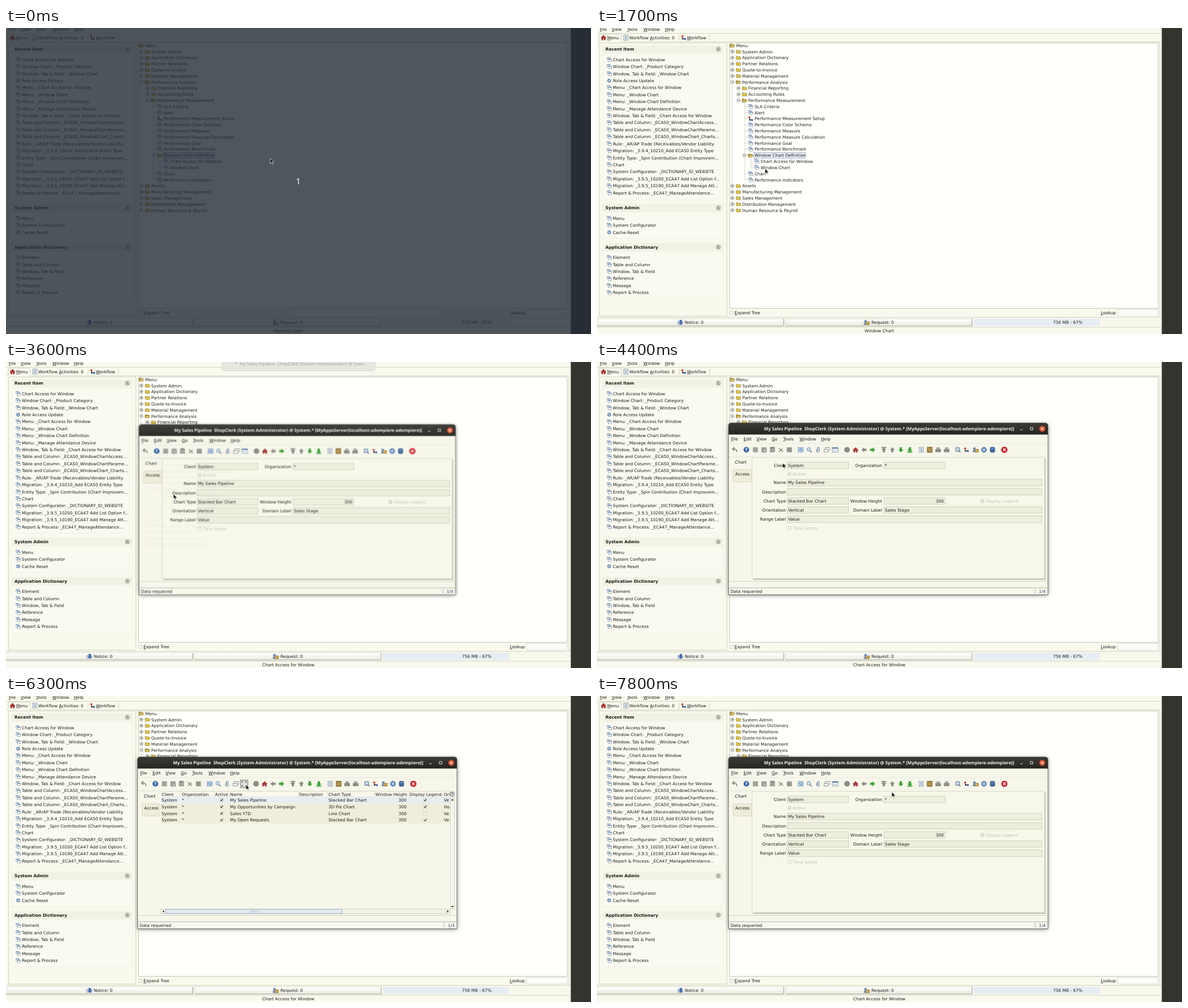
Animation of 1034 by 542 pixels, one loop 8000 ms. Source, as an HTML page:

```html
<!DOCTYPE html>
<html lang="en">
<head>
<meta charset="utf-8">
<title>Menu tree and chart window</title>
<style>
html, body { margin: 0; width: 100%; height: 100%; overflow: hidden; background: #34342f; }
svg { display: block; width: 1034px; height: 542px; }
text { font: 7.43px "DejaVu Sans", sans-serif; fill: #1c1c1a; white-space: pre; text-rendering: geometricPrecision; }
.bold { font-weight: bold; }
.italic { font-style: italic; }
.mid { text-anchor: middle; }
.end { text-anchor: end; }
.off { fill: #c3c3b6; }
.blue { fill: #34457c; }
.title { font: bold 7.8px "Noto Sans", "Open Sans", sans-serif; fill: #f2f1ec; }
.note { font: 7.8px "Noto Sans", "Open Sans", sans-serif; fill: #a3a39c; }
.count { font: 500 15px "Noto Sans", sans-serif; fill: #fff; }

#dim, #before, #after, #win, #note, #grid, #hover, #press, #cursor {
  animation: 8s step-end infinite;
}
#dim { animation-name: dim; }
#before { animation-name: before; }
#after { animation-name: after; }
#win { animation-name: win; transform-origin: 515px 408px; }
#note { animation-name: note; }
#grid { animation-name: grid; }
#hover { animation-name: hover; }
#press { animation-name: press; }
#cursor { animation-name: cursor; }

@keyframes dim { 0% { opacity: 1 } 6.25%, 100% { opacity: 0 } }
@keyframes before { 0% { opacity: 1 } 42.5%, 100% { opacity: 0 } }
@keyframes after { 0% { opacity: 0 } 42.5%, 100% { opacity: 1 } }
@keyframes win {
  0% { opacity: 0; transform: scale(.95) }
  43.75% { opacity: .5; transform: scale(.95) }
  45% { opacity: .96; transform: scale(.991) }
  46.25%, 100% { opacity: 1; transform: none }
}
@keyframes note { 0% { opacity: 0 } 43.75% { opacity: .5 } 45% { opacity: 1 } 46.25% { opacity: .5 } 47.5%, 100% { opacity: 0 } }
@keyframes grid { 0% { opacity: 0 } 68.75% { opacity: 1 } 80%, 100% { opacity: 0 } }
@keyframes hover { 0% { opacity: 0 } 61.25% { opacity: 1 } 92.5%, 100% { opacity: 0 } }
@keyframes press { 0% { opacity: 0 } 65% { opacity: 1 } 68.75% { opacity: 0 } 78.75% { opacity: 1 } 87.5%, 100% { opacity: 0 } }
/* The pointer advances once every 100 ms. */
@keyframes cursor {
  0% { transform: translate(467px, 231px) }
  6.25% { transform: translate(467px, 231px); animation-timing-function: steps(8) }
  16.25% { transform: translate(327px, 239px); animation-timing-function: steps(4) }
  21.25% { transform: translate(297px, 249px) }
  26.25% { transform: translate(297px, 249px); animation-timing-function: steps(3) }
  30% { transform: translate(296px, 234px) }
  50% { transform: translate(296px, 234px); animation-timing-function: steps(4) }
  55% { transform: translate(328px, 179px); animation-timing-function: steps(5) }
  61.25% { transform: translate(429px, 157px) }
  62.5% { transform: translate(429px, 157px); animation-timing-function: steps(2) }
  65% { transform: translate(424px, 157px) }
  93.75% { transform: translate(424px, 157px); animation-timing-function: steps(3) }
  97.5%, 100% { transform: translate(521px, 170px) }
}
</style>
</head>
<body>
<svg id="stage" viewBox="0 0 1034 542"></svg>
<script>
const CREAM = '#f9f9ed', PAPER = '#fffffb', EDGE = '#c9c9ba', FIELD = '#eeeedd';

// y is the middle of the capitals; "~" underlines the next letter.
const text = (x, y, s, cls = '') =>
  `<text x="${x}" y="${y + 2.7}" class="${cls}">` +
  s.replace(/~(.)/, '<tspan text-decoration="underline">$1</tspan>') + '</text>';
const rect = (x, y, w, h, fill, stroke = 'none', rx = 0) =>
  `<rect x="${x}" y="${y}" width="${w}" height="${h}" fill="${fill}" stroke="${stroke}" stroke-width=".8" rx="${rx}"/>`;
const path = (d, fill, stroke = 'none', width = .8) =>
  `<path d="${d}" fill="${fill}" stroke="${stroke}" stroke-width="${width}"/>`;
const disc = (x, y, r, fill, stroke = 'none') =>
  `<circle cx="${x}" cy="${y}" r="${r}" fill="${fill}" stroke="${stroke}"/>`;
const at = (x, y, s, turn = 0) => `<g transform="translate(${x} ${y}) rotate(${turn})">${s}</g>`;
const line = (d, color = EDGE, width = .8) => path(d, 'none', color, width);
const group = (id, s) => `<g id="${id}">${s}</g>`;

const pages = rect(-3.8, -3.6, 5.4, 4.4, '#f1f3f5', '#a3acb6') + rect(-3.8, -3.6, 5.4, 1.2, '#6d8db8') +
  rect(-1.5, -1, 5.4, 4.4, '#fafbfc', '#8e98a4') + rect(-1.5, -1, 5.4, 1.2, '#5d82b4');
const gear = disc(0, 0, 2.9, '#86a5c9', '#5f84b1') + disc(0, 0, 1.1, '#dfe8f1');
const flow = line('M-2-2V2H2', '#666') + rect(-3.6, -3.8, 3, 3, '#c92626') +
  rect(-2.6, .6, 2.6, 2.6, '#222') + rect(1, .8, 3, 3, '#2d4fa2');
const folder = path('M-3.7-2.6H-.8L0-1.7H3.7V2.8H-3.7Z', '#dfc646', '#8f7d2c', .7);
const openFolder = path('M-4-2.7H-1.2L-.4-1.8H2.6V2.8H-4Z', '#c2a63a', '#83742a', .7) +
  path('M-4 2.8L-2.2-.4H4.4L2.7 2.8Z', '#ecd76b', '#83742a', .7);
const home = path('M-4.6 .4L0-4.2L4.6 .4H3.3V4.2H1V1.5H-1V4.2H-3.3V.4Z', '#bd3030', '#6f2a2a', .6);
const lens = line('M1.5 1.5L4.5 4.5', '#6d7681', 1.6) + disc(-.8, -.8, 3.2, '#cfe0f2', '#6e87a6');
const tick = on => rect(-2.7, -2.7, 5.4, 5.4, '#fbfbf4', '#c6c6b8') + (on ? line('M-1.6-.2L-.4 1.4L1.9-1.7', on, 1.1) : '');
const paper = rect(-3.8, -4.4, 7.6, 8.8, '#f6f8fa', '#73859a') + line('M-2-2H2M-2 0H2M-2 2H2', '#4d6c94');
const clerk = rect(-3, -1, 8, 5, '#d8ab45', '#8b6c24') + disc(-2, -2, 2.4, '#6e8fb8') + rect(-5, 1, 5, 3, '#6e8fb8');
const arrow = color => path('M0-4.6L4.6 .2H2V4.4H-2V.2H-4.6Z', color);
const barArrow = color => arrow(color) + rect(-4.5, -5, 9, 1.8, color);

const chevron = y => disc(214.5, y, 3.7, '#f3f3e8', '#8f8f84') +
  line(`M212.7 ${y - .2}l1.8-1.8l1.8 1.8M212.7 ${y + 2.2}l1.8-1.8l1.8 1.8`, '#222', 1);

function section(y, title, rows) {
  let s = rect(10, y - 7, 213, 14, '#f1f1e4') + text(15, y, title, 'bold') + chevron(y);
  s += rect(10, y + 8, 213, rows.length * 12.42 + 9, '#fafaf0', '#f1f1e5');
  rows.forEach((row, i) => {
    const ry = y + 18.5 + i * 12.42;
    s += at(21.5, ry, /Role|Cache/.test(row) ? gear : pages) + text(28, ry, row);
  });
  return s;
}

// Each row: depth, kind (+ closed, - open, . leaf, f flow) and label.
const treeRows = `0-Menu|1+System Admin|1+Application Dictionary|1+Partner Relations|1+Quote-to-Invoice
1+Material Management|1-Performance Analysis|2+Financial Reporting|2+Accounting Rules
2-Performance Measurement|3.SLA Criteria|3.Alert|3fPerformance Measurement Setup
3.Performance Color Schema|3.Performance Measure|3.Performance Measure Calculation|3.Performance Goal
3.Performance Benchmark|3-Window Chart Definition|4.Chart Access for Window|4.Window Chart|3.Chart
3.Performance Indicators|1+Assets|1+Manufacturing Management|1+Sales Management
1+Distribution Management|1+Human Resource & Payroll`.split(/[|\n]/);

function tree() {
  let s = line('M239 36V323M250 101V128M261 133V269M272 231V247', '#c4c4bc', .7);
  treeRows.forEach((row, i) => {
    const depth = +row[0], kind = row[1], x = 246 + depth * 10.8, y = 31 + i * 10.81, ex = x - 17.6;
    if (depth) s += line(`M${ex} ${y}H${x - 10}`, '#c4c4bc', .7);
    if (depth && '+-'.includes(kind))
      s += rect(ex - 2.4, y - 2.4, 4.8, 4.8, '#fff', '#9a9a90') +
        line(`M${ex - 1.5} ${y}h3` + (kind == '+' ? `M${ex} ${y - 1.5}v3` : ''), '#333');
    s += at(x - 6.8, y, { '+': folder, '-': openFolder, '.': pages, f: flow }[kind]) + text(x, y, row.slice(2));
  });
  return s;
}

const statusButton = x => rect(x, 515, 330, 12.6, 'url(#button)', '#d5d5c8') +
  line(`M${x} 527.8H${x + 330}V515`, '#a5a59a', 1);

function desktop() {
  return rect(0, 0, 1034, 542, '#34342f') + rect(0, 0, 998.3, 542, CREAM) +
    [[5, '~File'], [26, '~View'], [53, '~Tools'], [82, '~Window'], [120, '~Help']].map(m => text(m[0], 2, m[1])).join('') +
    line('M0 9.5H998M0 24.5H4M42.5 24.5H994') + line('M4 24V13Q4 11 6 11H40.5Q42.5 11 42.5 13V24M145 12V23M199 12V23') +
    at(11.5, 17, home) + text(18, 17, '~Menu') +
    at(51, 17, paper) + text(57, 17, 'Workflow ~Activities: 0') +
    at(153, 17, flow) + text(159, 17, '~Workflow') +
    rect(4.5, 26.5, 225, 483.5, CREAM, EDGE) +
    section(37.5, 'Recent Item', ['Chart Access for Window', 'Window Chart: _Product Category',
      'Window, Tab & Field: _Window Chart', 'Role Access Update', 'Menu: _Chart Access for Window',
      'Menu: _Window Chart', 'Menu: _Window Chart Definition', 'Menu: _Manage Attendance Device',
      'Window, Tab & Field: _Chart Access for Window', 'Table and Column: _ECA50_WindowChartAccess...',
      'Table and Column: _ECA50_WindowChartParame...', 'Table and Column: _ECA50_WindowChart_Charts...',
      'Rule: _AR/AP Trade (Receivables/Vendor Liability', 'Migration: _3.9.4_10210_Add ECA50 Entity Type',
      'Entity Type: _Spin Contribution (Chart Improvem...', 'Chart', 'System Configurator: _DICTIONARY_ID_WEBSITE',
      'Migration: _3.9.5_10200_ECA47 Add List Option f...', 'Migration: _3.9.5_10190_ECA47 Add Manage Att...',
      'Report & Process: _ECA47_ManageAttendance...']) +
    section(318.5, 'System Admin', ['Menu', 'System Configurator', 'Cache Reset']) +
    section(388, 'Application Dictionary', ['Element', 'Table and Column', 'Window, Tab & Field',
      'Reference', 'Message', 'Report & Process']) +
    rect(234.5, 26.5, 757.5, 470, PAPER, '#b9b9ac') + line('M995 24V512M0 512.5H998') +
    group('before', rect(277, 220.7, 91, 9.8, '#e8eef4', '#8fa5bd') + text(499, 536, 'Window Chart', 'mid')) +
    group('after', rect(287.5, 231.5, 94.5, 10, '#e7ebef') + text(499, 536, 'Chart Access for Window', 'mid')) +
    tree() +
    at(237.5, 504.5, tick()) + text(243, 504.5, '~Expand Tree') +
    text(917, 504.5, '~Lookup', 'end') + rect(920, 498.5, 72, 11.5, '#fbfbf8', '#d2d2cc') +
    statusButton(0) + statusButton(333) +
    rect(666, 515, 332, 13, '#f7f7ec') + rect(666, 515, 223, 13, '#e7eef3') +
    at(147, 521.5, rect(-4, -2, 8, 5.5, '#e9eef4', '#7788a0') + at(1, 0, arrow('#456fae'), 180)) +
    text(155, 521.5, 'Notice: 0') + at(476.5, 521.5, clerk) + text(485, 521.5, 'Request: 0') +
    text(832, 521.5, '756 MB - 67%', 'mid') + line('M0 530H998');
}

const GRAY = '#8d8d86', GREEN = '#3ba336';
function toolbar() {
  const printer = rect(-3, -4.5, 6, 4, '#aaa') + rect(-5, -1.2, 10, 5.4, GRAY, 'none', 1);
  const box = rect(-4.5, -4.5, 9, 9, '#a3a39b', 'none', .8);
  const chest = rect(-4.3, -4.5, 8.6, 9, '#9a7b32', '#6f571f') + line('M-4-1.5H4M-4 1.5H4', '#ead69a');
  const help = disc(0, 0, 5, '#3868a8') + '<text class="mid" y="2.8" style="fill:#fff;font-weight:bold">?</text>';
  const icons = [
    [243, line('M4 4Q5-2-3-1.5M0-4.5L-3.5-1.5L0 1.5', GRAY, 1.7)], [264, help],
    [280, box], [295, box + rect(-1.5, -1.5, 6, 6, '#b9b9b0', '#888')], [310, box + rect(-3, -5, 6, 2, '#777')],
    [325, line('M-3.5-3L3.5 3.5M3-2L-3.5 3.5', '#85857e', 1.6)], [340, box + line('M-4-1H4M-4 2H4', '#777')],
    [360, rect(-4.5, -4, 9, 8, '#e4edf7', '#5d86b8') + line('M-3 1Q-2-3 2-1.5M3-1Q2 3-2 1.5', '#3d6fac', 1.2)],
    [375, lens], [391, line('M-1.5 2V-3Q0-6 1.5-3V3Q0 6-2.5 3V-1', '#5b77a8', 1.1)],
    [406, rect(-2, -4, 7, 5, '#fff', '#777') + rect(-4.5, -1, 7, 5, '#fff', '#777')],
    [421, rect(-5, -4, 10, 8, '#f8fafc', '#71879f') + rect(-5, -4, 10, 2, '#4976b0') + line('M-3 1H3', '#89a')],
    [442, disc(0, 0, 5, GRAY)], [457, home], [472, arrow(GRAY), -90], [487, arrow(GREEN), 90],
    [507, barArrow(GRAY)], [522, arrow(GRAY)], [537, arrow(GREEN), 180], [553, barArrow(GREEN), 180],
    [573, paper], [588, chest], [603, printer], [618, printer], [638, rect(-4, -4, 7, 7, '#dfe6ee', '#8191a5') + lens],
    [653, flow], [669, clerk], [684, disc(0, 0, 4.5, '#7799c6', '#446da4') + disc(0, 0, 1.5, '#e9eef4')],
    [699, rect(-4, -4.5, 8, 9, '#3e68a5', '#2d4f82', 2) + line('M-3-2H3', '#9fbbdd')],
    [720, disc(0, 0, 5.5, '#d31f28') + line('M-2.2-2.2L2.2 2.2M2.2-2.2L-2.2 2.2', '#fff', 1.6)],
  ];
  return icons.map(([x, icon, turn]) => at(x, 155.5, icon, turn)).join('');
}

function form() {
  const field = (y, label, value, x = 336, w = 108, align = '') =>
    text(x == 336 ? 334 : 504, y, label, 'end') + rect(x + .5, y - 5.7, w, 11.6, FIELD, '#c8c8b3') +
    text(align ? x + w - 2 : x + 1.7, y, value, align);
  const check = (x, y, label, on) => at(x, y, tick(on)) + text(x + 6, y, label, 'off');
  return rect(276, 171, 517, 215, '#c7c7ba') + rect(274, 169, 517, 214.5, '#f7f7ea', '#cfcfc0') +
    field(183, 'Client', 'System') + field(183, 'Organization', '*', 507) +
    check(340, 198.3, 'Active', '#bbbbae') +
    field(213.5, 'Name', 'My Sales Pipeline', 336, 450) + field(229.8, 'Description', '', 336, 450) +
    field(246, 'Chart Type', 'Stacked Bar Chart') + field(246, 'Window Height', '300', 507, 108, 'end') +
    check(681, 246, 'Display Legend', '#bbbbae') +
    field(262, 'Orientation', 'Vertical') + field(262, 'Domain Label', 'Sales Stage', 507, 279) +
    field(278.3, 'Range Label', 'Value', 336, 450) + check(340, 294, 'Time Series');
}

function grid() {
  const left = [275, 311, 396, 518, 570, 774];
  let s = rect(273, 168, 521, 218, '#f8f8ec') + line('M274 179H786M274 168.8H792') + rect(274, 179, 511.5, 197, '#f6f6e9');
  ['Client', 'Organization', 'Name', 'Description', 'Chart Type', 'Ori'].forEach((h, i) => s += text(left[i], 174, h));
  s += text(381, 174, 'Active', 'mid') + text(709, 174, 'Window Height', 'end') + text(741.5, 174, 'Display Legend', 'mid');
  s += line('M309 170V178M368 170V178M394 170V178M516 170V178M568 170V178M651 170V178M711 170V178M772 170V178', '#dadacc');
  [['My Sales Pipeline', 'Stacked Bar Chart', 'Ve'], ['My Opportunities by Campaign', '3D Pie Chart', 'Ho'],
    ['Sales YTD', 'Line Chart', 'Ve'], ['My Open Requests', 'Stacked Bar Chart', 'Ve']].forEach(([name, type, dir], i) => {
    const y = 184.3 + i * 11.8;
    s += rect(274, y - 5.6, 511.5, 11.6, i ? '#eeeedb' : '#e8edf2');
    ['System', '*', name, '', type, dir].forEach((v, c) => s += text(left[c], y, v));
    s += text(708, y, '300', 'end') + at(381, y, tick('#111')) + at(741, y, tick(i == 2 ? '' : '#111'));
  });
  s += rect(785.5, 179, 7, 198, '#f1f1e5', EDGE) + rect(786, 188, 6, 180, '#f6f6ee') +
    path('M786.7 185h4.6l-2.3-2.6ZM786.7 372h4.6l-2.3 2.6Z', '#222') +
    rect(785.8, 170.5, 6, 6.5, '#fff', '#555') + line('M786 173H792M788.8 171V177', '#555') +
    rect(274, 377.5, 511.5, 8, '#f1f1e5', EDGE) + rect(282, 377.8, 312, 7.4, '#e3ebf3', '#8fa2b7') +
    path('M279.3 379.2v4.6l-2.6-2.3ZM779.8 379.2v4.6l2.6-2.3Z', '#222');
  for (let x = 431; x < 448; x += 2) s += line(`M${x} 379.5v4`, '#b4c3d2');
  const corners = [0, 90, 180, 270].map(turn => at(0, 0, path('M-4.2-4.2H-1.2L-4.2-1.2Z', '#53687f'), turn)).join('');
  return s + rect(414.5, 149, 13, 13, '#e6e6d9', '#b3b3a6') +
    at(421, 155.5, rect(-4.8, -4.8, 9.6, 9.6, '#fbfcfd') + corners);
}

const appTitle = 'My Sales Pipeline  ShopClerk (System Administrator) @ Syste';
function chartWindow() {
  return rect(233, 110, 564, 303, '#4a4a46', 'none', 4).replace('/>', ' filter="url(#shadow)" opacity=".8"/>') +
    path('M232.5 412.5V113Q232.5 108 237.5 108H792Q797 108 797 113V412.5Z', '#f6f6ea', '#5d5d57') +
    path('M232.5 128.5V113Q232.5 108 237.5 108H792Q797 108 797 113V128.5Z', 'url(#bar)') +
    text(516.5, 118.5, appTitle + 'm.* [MyAppsServer{localhost-adempiere-adempiere}]', 'title mid') +
    line('M748 120H752.3M766 116H770.4V120.4H766Z', '#e6e5df', 1) + disc(787, 118.3, 5.2, '#e4532f') +
    line('M785 116.3l4 4m0-4l-4 4', '#fff', 1.1) +
    [[237, '~File'], [259, '~Edit'], [282, '~View'], [309, '~Go'], [329, '~Tools'], [358, '~Window'], [396, '~Help']]
      .map(m => text(m[0], 136, m[1])).join('') + line('M233 144.5H797', '#e8e8da') +
    group('hover', rect(414.3, 149, 13.4, 13.4, '#ebebdf', '#b4b4a8')) + toolbar() +
    line('M233 168H273', '#dcdccf') + text(254, 177, 'Chart', 'italic mid') +
    rect(240.5, 191, 32.5, 21.5, '#f0ecda', '#d2cdb9', 1.5) + text(257, 198, 'Access', 'mid') +
    form() + group('grid', grid()) +
    group('press', rect(414.5, 149, 13, 13, 'rgba(70,70,60,.14)', '#8b8b80')) +
    line('M233 388.5H797M233 399.5H797') + rect(233.5, 400.5, 540, 11, '#f8f8ee', '#cfcfc1') +
    rect(775.5, 400.5, 20.5, 11, '#f8f8ee', '#cfcfc1') +
    text(236, 406.3, 'Data requeried') + text(787, 406.3, '1/4', 'blue mid');
}

const defs = `<defs>
  <linearGradient id="button" x2="0" y2="1"><stop stop-color="#fff"/><stop offset="1" stop-color="#ecece0"/></linearGradient>
  <linearGradient id="bar" x2="0" y2="1"><stop stop-color="#3b3a35"/><stop offset="1" stop-color="#262521"/></linearGradient>
  <filter id="shadow" x="-5%" y="-5%" width="110%" height="110%"><feGaussianBlur stdDeviation="3.5"/></filter>
</defs>`;

document.getElementById('stage').innerHTML = defs + desktop() + group('win', chartWindow()) +
  group('note', rect(382, -8, 270.5, 23.5, '#e7e7df', '#d3d3cb', 4) + text(522, 3.3, '*  ' + appTitle + '...', 'note mid')) +
  group('dim', rect(0, 0, 1034, 542, 'rgba(36,44,54,.8)') +
    '<text x="516.5" y="277" class="count mid">1</text>') +
  group('cursor', path('M0 0V9L2.2 7L3.7 10.2L5.1 9.6L3.7 6.5H6.6Z', '#161616', '#f4f4f0', .7));
</script>
</body>
</html>
```
